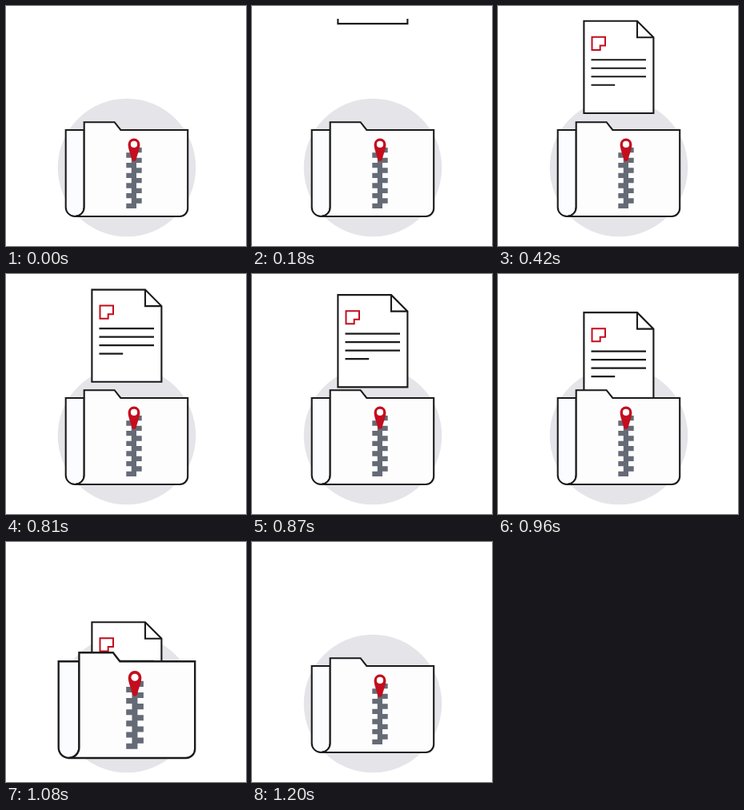
An HTML page for the animation above (1560 ms loop, 300 by 300 pixels).

```html
<!DOCTYPE html>
<html lang="en">
<head>
<meta charset="utf-8">
<title>Zip folder</title>
<style>
  html, body { margin: 0; width: 100%; height: 100%; overflow: hidden; background: #fff; }
  svg { display: block; width: 100vw; height: 100vh; }
  .ink { stroke: #1a1a1a; stroke-width: 2.1; }
  .red { stroke: #c40d1e; stroke-width: 2; }
</style>
</head>
<body>
<svg viewBox="0 0 300 300" fill="none">
  <clipPath id="slot"><rect x="100" y="16" width="100" height="194"/></clipPath>
  <circle cx="151" cy="202" r="86.3" fill="#e5e4e9"/>

  <g clip-path="url(#slot)">
    <g id="page">
      <path class="ink" fill="#fff" d="M107.4 18.8H174L194.4 39.3V134H107.4Z"/>
      <path class="ink" d="M174 18.8V39.3H194.4"/>
      <path class="red" d="M117.5 38.8H134V49.4H127.7V55H117.5Z"/>
      <path class="ink" d="M116.5 67.3H185M116.5 77.8H185M116.5 88.3H185M116.5 98.8H146.2"/>
    </g>
  </g>

  <g id="folder">
    <path class="ink" fill="#fafcff" d="M97.7 155H74.7V251.5a11.5 11.5 0 0 0 23 0Z"/>
    <path class="ink" fill="#fdfdfd" d="M97.7 145.2H135.6L143.3 155H227.2V253a10 10 0 0 1 -10 10H86.2a11.5 11.5 0 0 0 11.5 -11.5Z"/>
    <path id="zip" fill="#656b76"/>
    <path fill="#c40d1e" d="M152.6 173a7.4 7.4 0 0 1 14.8 0C167.4 179 164.5 184 162.9 191.5Q162.3 194 160 194T157.1 191.5C155.5 184 152.6 179 152.6 173Z"/>
    <circle cx="160" cy="172.9" r="4.1" fill="#fff"/>
  </g>
</svg>
<script>
  const LOOP = 1560, STEP = 30;
  const page = document.getElementById('page');
  const folder = document.getElementById('folder');

  // Zipper: a spine with teeth alternating right and left
  const PITCH = 6.33;
  let teeth = 'M156.8 177H163V252.9H156.8Z';
  for (let i = 0; i < 12; i++) {
    const x = i % 2 ? 150.3 : 163;
    teeth += `M${x} ${177 + i * PITCH}h6.7v${PITCH}h-6.7Z`;
  }
  document.getElementById('zip').setAttribute('d', teeth);

  // Both moves accelerate quadratically
  function pageOffset(t) {
    if (t < 420) return -137 * (1 - (t / 420) ** 2);
    if (t < 780) return 0;
    return 0.815 * ((t - 780) / STEP) ** 2;
  }

  function folderScale(t) {
    const p = Math.max(0, 1 - Math.abs(t - 1080) / 120);
    return 1 + 0.118 * (1 - Math.cos(Math.PI * p)) / 2;
  }

  function draw(now) {
    const t = Math.floor((now % LOOP) / STEP) * STEP;
    page.setAttribute('transform', `translate(0 ${pageOffset(t)})`);
    page.setAttribute('visibility', t < 1170 ? 'visible' : 'hidden');
    folder.setAttribute('transform',
      `translate(151 204) scale(${folderScale(t)}) translate(-151 -204)`);
  }

  const start = performance.now();
  function tick() {
    draw(performance.now() - start);
    requestAnimationFrame(tick);
  }
  tick();
</script>
</body>
</html>
```
